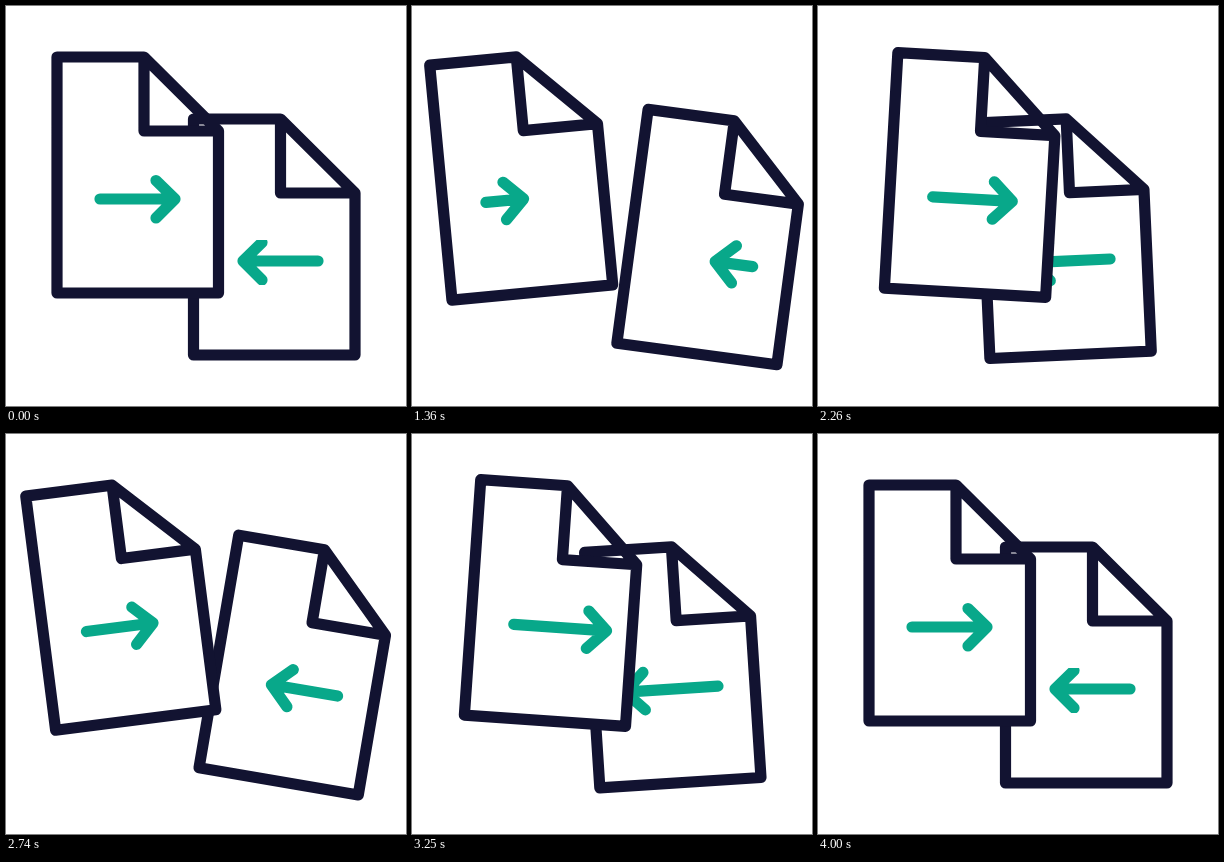
An HTML page that plays this animation: 400x400 px, repeating every 4030 ms.

```html
<!DOCTYPE html>
<html>
<head>
<meta charset="utf-8">
<style>
html, body { margin: 0; height: 100%; overflow: hidden; background: #fff; }
svg { display: block; width: 100vw; height: 100vh; }
path { stroke-width: 11.2; stroke-linecap: round; stroke-linejoin: round; }
.sheet { fill: #fff; stroke: #121331; }
.arrow { fill: none; stroke: #08a88a; }
</style>
</head>
<body>
<svg viewBox="0 0 400 400">
  <defs>
    <path id="sheet" class="sheet" d="M-80.5-118H6.5L81-44V118H-80.5ZM6.5-118V-44H81"/>
    <clipPath id="trim"><rect x="-44" y="3" width="100" height="45"/></clipPath>
  </defs>
  <g id="right"><use href="#sheet"/><g id="rightArrow"><path class="arrow"/></g></g>
  <g id="left"><use href="#sheet"/><path class="arrow"/></g>
</svg>
<script>
const LOOP = 4030, START = 1030, END = 4000, STEP = 30;

// Each track is a list of [time, value] poses, eased with a sine between them.
const shiftTimes = [1000, 1480, 1830, 2260, 2690, 3120, 3550, 4000];
const turnTimes = [1000, 1520, 1905, 2355, 2750, 3190, 3570, 4000];
const lengthTimes = [1000, 1480, 1935, 2390, 2820, 3250, 3640, 4000];
const track = (times, values) => times.map((t, i) => [t, values[i]]);

const pages = [
  { id: 'left', x: 131.5, y: 169, tail: -37.5, dir: 1,
    shift: track(shiftTimes, [0, -26.4, -27.6, 22, -18, 14, -8.2, 0]),
    turn: track(turnTimes, [0, -6.9, -7.1, 4.5, -7.3, 4.5, -4.2, 0]) },
  { id: 'right', x: 268, y: 231, tail: 44, dir: -1,
    shift: track(shiftTimes, [0, 37.8, 39, -21, 25.5, -12.6, 12, 0]),
    turn: track(turnTimes, [0, 9.7, 10.1, -4.1, 9.7, -4.3, 5.7, 0]) }
];
const arrowLength = track(lengthTimes, [75, 31.5, 31, 91, 65, 93, 70, 75]);

function sample(keys, t) {
  const i = keys.findIndex(k => k[0] > t);
  if (i < 0) return keys[keys.length - 1][1];
  if (i === 0) return keys[0][1];
  const [t0, a] = keys[i - 1], [t1, b] = keys[i];
  return a + (b - a) * (1 - Math.cos(Math.PI * (t - t0) / (t1 - t0))) / 2;
}

for (const p of pages) {
  p.node = document.getElementById(p.id);
  p.arrow = p.node.querySelector('.arrow');
}
const rightArrow = document.getElementById('rightArrow');

function draw(now) {
  const time = now % LOOP;
  const resting = time < START || time >= END;
  const t = resting ? 0 : START + Math.floor((time - START) / STEP) * STEP;
  const len = sample(arrowLength, t);
  for (const p of pages) {
    const tip = p.tail + p.dir * len, wing = tip - p.dir * 19;
    p.node.setAttribute('transform',
      `translate(${p.x + sample(p.shift, t)} ${p.y}) rotate(${sample(p.turn, t)})`);
    p.arrow.setAttribute('d', `M${p.tail} 24H${tip}M${wing} 5.5L${tip} 24L${wing} 43`);
  }
  // At rest the right arrow head is cut flat at top and bottom.
  rightArrow.setAttribute('clip-path', resting ? 'url(#trim)' : 'none');
}

const begin = performance.now();
function tick() {
  draw(performance.now() - begin);
  requestAnimationFrame(tick);
}
tick();
</script>
</body>
</html>
```
